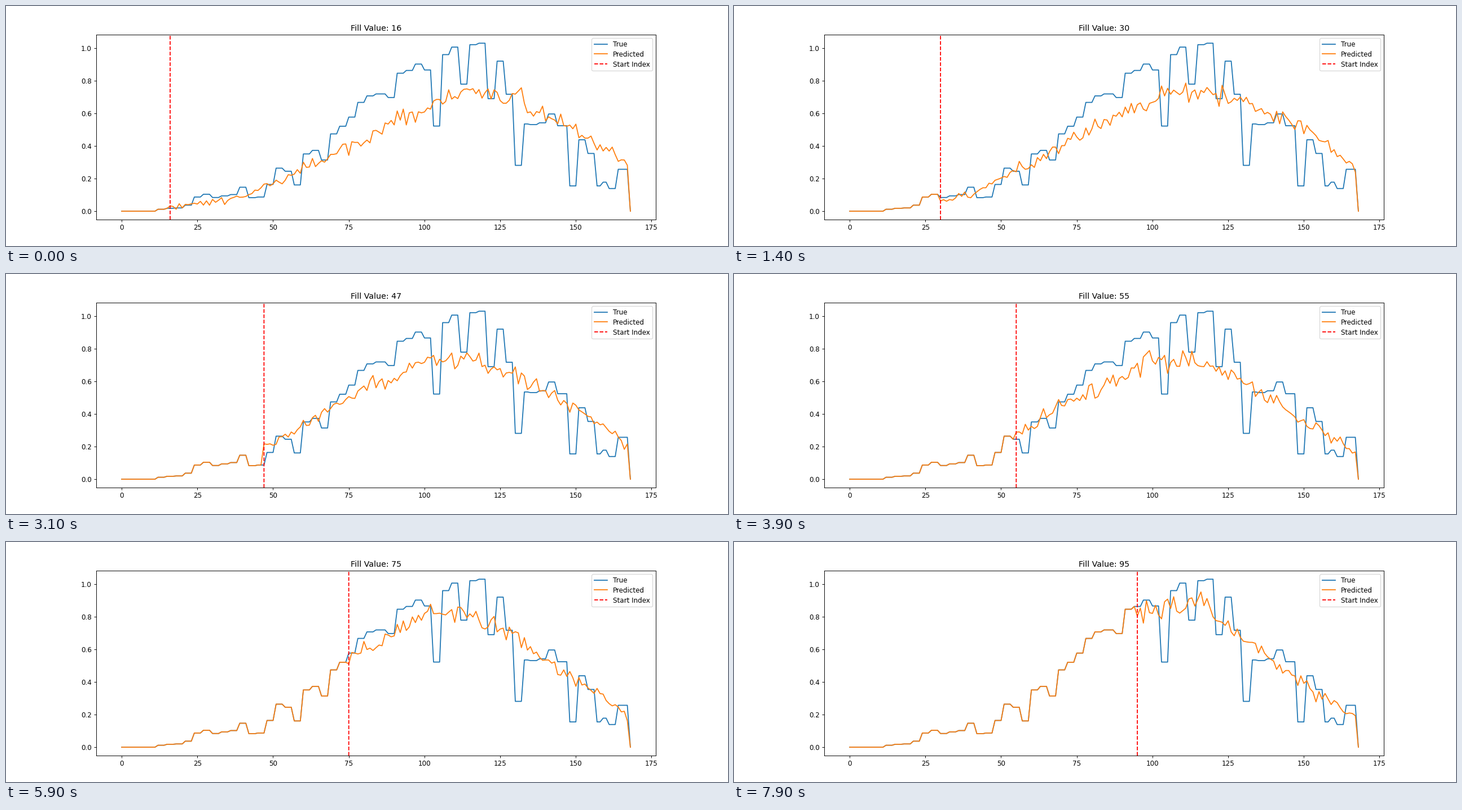
Recreate the animation shown at these times as a matplotlib script. Size 1280 px wide and 427 px high, loop 8000 ms.

```python
import numpy as np
import matplotlib.pyplot as plt
from matplotlib.animation import FuncAnimation

FIRST_FILL, FRAMES, INTERVAL = 16, 80, 100
LAST = 168
x = np.arange(LAST + 1)

# Step levels in thousandths; most steps last three samples.
LEVELS = [
    12, 18, 20, 37, 87, 104, 84, 94, 102, 147, 83, 87, 164,
    264, 245, 161, 351, 373, 314, 474, 521, 577, 667, 707, 719, 697,
    846, 863, 902, 866, 522, 960, 1006, 779, 1021, 1030, 690, 920, 717,
    281, 535, 531, 542, 596, 524, 155, 438, 354, 155, 178, 139, 257,
]
ODD_LENGTHS = {24: 4, 40: 2, 44: 4, 48: 2, 49: 2, 51: 4}

# Forecast trend: key points along x for a few fill values.
KNOTS = [12, 40, 60, 80, 100, 115, 130, 145, 157, 167]
TRENDS = {
    16: [.02, .08, .26, .43, .65, .73, .71, .54, .42, .28],
    40: [.02, .11, .33, .55, .72, .72, .68, .55, .42, .25],
    60: [.02, .11, .34, .54, .73, .73, .58, .37, .23, .13],
    84: [.02, .11, .34, .62, .84, .88, .74, .53, .40, .21],
    95: [.02, .11, .34, .75, .84, .87, .69, .47, .30, .18],
}


def step_series():
    lengths = [ODD_LENGTHS.get(i, 3) for i in range(len(LEVELS))]
    steps = np.repeat(LEVELS, lengths) / 1000
    return np.concatenate([np.zeros(12), steps, [0]])


def forecast(fill):
    heights = [np.interp(fill, list(TRENDS), column)
               for column in zip(*TRENDS.values())]
    trend = np.interp(x, KNOTS, heights)
    noise = np.random.default_rng(fill).normal(size=x.size)
    return np.maximum(trend + noise * (0.01 + 0.03 * trend), 0)


true = step_series()


def predicted(fill):
    values = np.where(x < fill, true, forecast(fill))
    values[LAST] = 0
    return values


fig, ax = plt.subplots(figsize=(15, 427 * 3 / 256), dpi=256 / 3)
ax.plot(x, true, label="True")
pred_line, = ax.plot(x, predicted(FIRST_FILL), label="Predicted")
start_line = ax.axvline(FIRST_FILL, color="red", linestyle="--",
                        label="Start Index", snap=False)
title = ax.set_title("")
ax.legend(loc="upper right", labelspacing=0.42, borderpad=0.38)


def update(frame):
    fill = FIRST_FILL + frame
    pred_line.set_ydata(predicted(fill))
    start_line.set_xdata([fill, fill])
    title.set_text(f"Fill Value: {fill}")
    return pred_line, start_line, title


anim = FuncAnimation(fig, update, frames=FRAMES, interval=INTERVAL,
                     repeat=True, repeat_delay=0)
plt.show()
```
